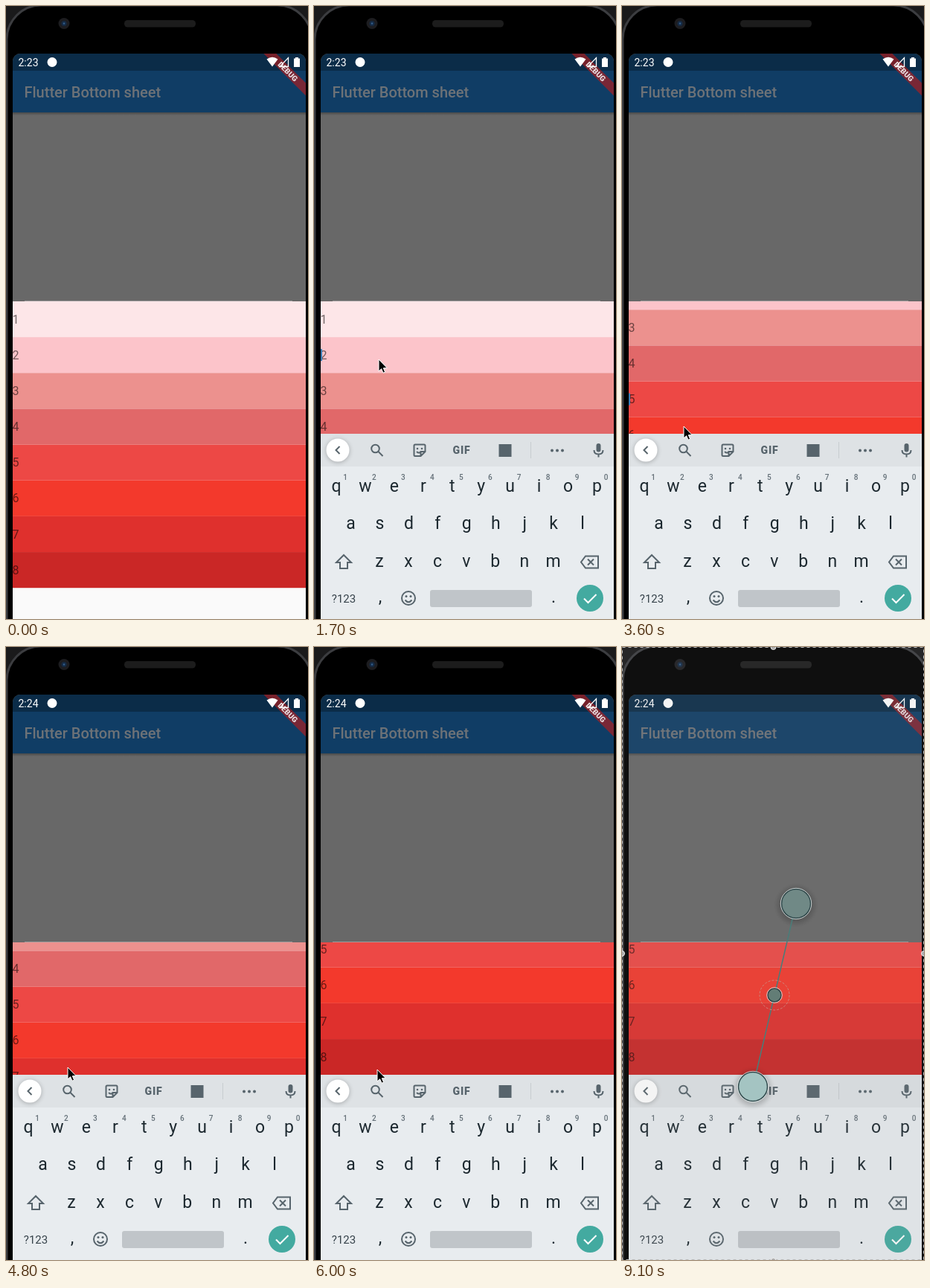
An HTML page for the animation above (9200 ms loop, 406 by 824 pixels).

```html
<!DOCTYPE html>
<html lang="en">
<head>
<meta charset="utf-8">
<title>Bottom sheet with keyboard</title>
<style>
  html, body { margin: 0; width: 100%; height: 100%; overflow: hidden; background: #000; }
  svg { display: block; width: 406px; height: 824px; font-family: Roboto, sans-serif; }
  .icon { fill: none; stroke: #57646c; stroke-width: 2; }
  .solid { fill: #57646c; }
  .mid { text-anchor: middle; }
</style>
</head>
<body>
<svg viewBox="0 0 406 824">
  <defs>
    <clipPath id="screenClip"><rect x="9" y="64" width="394" height="780" rx="10"/></clipPath>
    <clipPath id="sheetClip"><rect x="9" y="397" width="394" height="427"/></clipPath>
    <linearGradient id="barShadow" x2="0" y2="1">
      <stop stop-color="#000" stop-opacity=".3"/><stop offset="1" stop-color="#000" stop-opacity="0"/>
    </linearGradient>
    <filter id="soft" x="-50%" y="-50%" width="200%" height="200%"><feGaussianBlur stdDeviation="3"/></filter>
  </defs>

  <!-- phone body -->
  <rect width="406" height="824" fill="#1a1a1b"/>
  <rect x="1" y="-1" width="410" height="900" rx="46" fill="#000" stroke="#3c3d40" stroke-width="3"/>
  <circle cx="78" cy="23.500" r="7.500" fill="#1d1d20"/>
  <circle cx="78" cy="23.500" r="3.500" fill="#152a44"/>
  <circle cx="78" cy="23.500" r="1.200" fill="#35608c"/>
  <rect x="159" y="19" width="96" height="9.500" rx="4.500" fill="#1c1c1c"/>

  <g clip-path="url(#screenClip)">
    <rect x="9" y="64" width="394" height="760" fill="#686868"/>
    <rect x="9" y="64" width="394" height="23" fill="#0b2c48"/>
    <rect x="9" y="87" width="394" height="56" fill="#103d65"/>
    <rect x="9" y="143" width="394" height="4" fill="url(#barShadow)"/>
    <text x="24.500" y="123" font-size="20" font-weight="500" fill="#6d7277">Flutter Bottom sheet</text>

    <path d="M25 396.500H385" stroke="#fff" stroke-opacity=".35"/>
    <g clip-path="url(#sheetClip)">
      <rect x="9" y="397" width="394" height="427" fill="#fafafa"/>
      <g id="rows"></g>
      <rect id="caret" x="9" width="2" height="16" fill="#3c7fb8"/>
    </g>

    <g id="keyboard">
      <rect x="9" y="575" width="394" height="249" fill="#e8ecef"/>
      <rect x="9" y="575" width="394" height="44" fill="#dee2e5"/>
      <circle cx="32" cy="598" r="15.500" fill="#000" opacity=".25" filter="url(#soft)"/>
      <circle cx="32" cy="597" r="15.500" fill="#fff"/>
      <path class="icon" d="M34.500 592L29.500 597L34.500 602"/>
      <circle class="icon" cx="82.500" cy="595" r="5.300"/>
      <path class="icon" d="M86.500 599L92.500 605"/>
      <path class="icon" d="M136 589.500H148Q149.500 589.500 149.500 591V599L143.500 605H136Q134.500 605 134.500 603.500V591Q134.500 589.500 136 589.500ZM149 599H143.500V605M138 599Q141 602 144 599"/>
      <circle class="solid" cx="139" cy="595" r="1.300"/><circle class="solid" cx="145" cy="595" r="1.300"/>
      <text class="solid mid" x="198.500" y="602" font-size="14" font-weight="900" letter-spacing=".8">GIF</text>
      <rect class="solid" x="248.500" y="589" width="17" height="17"/>
      <path d="M291.500 586V608" stroke="#c7ccd0"/>
      <circle class="solid" cx="320" cy="597.500" r="2"/><circle class="solid" cx="327" cy="597.500" r="2"/><circle class="solid" cx="334" cy="597.500" r="2"/>
      <rect class="solid" x="379.500" y="588" width="6" height="11.500" rx="3"/>
      <path class="icon" d="M376.500 597Q376.500 602.500 382.500 602.500T388.500 597M382.500 602V606.500" stroke-width="1.700"/>

      <g id="letters" class="mid" font-size="23" fill="#1c282f"></g>
      <path class="icon" d="M40 738L50 748H45V756H35V748H30Z"/>
      <path class="icon" d="M365 739.500H382V755.500H365L359 747.500ZM368 743.500L376 751.500M376 743.500L368 751.500"/>
      <text class="mid" x="40" y="802" font-size="15" fill="#36424a">?123</text>
      <circle class="icon" cx="127" cy="796" r="9"/>
      <path class="icon" d="M122.500 798.500Q127 804 131.500 798.500"/>
      <circle class="solid" cx="124" cy="793.500" r="1.500"/><circle class="solid" cx="130" cy="793.500" r="1.500"/>
      <rect x="156" y="785" width="137" height="23" rx="3" fill="#c0c5c9"/>
      <circle cx="371" cy="796" r="18" fill="#43aaa0"/>
      <path d="M363 796.500L368.500 802L379.500 791" fill="none" stroke="#fff" stroke-width="2"/>
    </g>

    <!-- debug ribbon -->
    <g transform="translate(403 64) rotate(45)">
      <rect x="-50" y="28" width="100" height="12" fill="#b71c1c" fill-opacity=".63"/>
      <text class="mid" y="37.700" font-size="10.200" font-weight="900" fill="#fff" fill-opacity=".85">DEBUG</text>
    </g>

    <!-- status bar -->
    <g fill="#fff">
      <text id="clock" x="16.500" y="81" font-size="14"></text>
      <circle cx="62" cy="75.500" r="6.500"/>
      <path d="M350.500 71.500Q358 66 365.500 71.500L358 81.500Z"/>
      <path d="M379.500 69.500V81.500H368Z" fill="none" stroke="#fff" stroke-width="1.300"/>
      <path d="M387 70.500H389V69H393V70.500H395V82H387Z"/>
    </g>
  </g>

  <path id="mouse" d="M0 0V16L3.600 12.700L6 18.200L8.600 17.100L6.300 11.700H11.300Z" fill="#000" stroke="#fff"/>

  <g id="pinch">
    <circle cx="234" cy="347" r="25" fill="#000" opacity=".2" filter="url(#soft)"/>
    <circle cx="176" cy="593" r="24" fill="#000" opacity=".2" filter="url(#soft)"/>
    <path d="M229.500 364L180.500 572" stroke="#417a76" stroke-width="1.500"/>
    <circle cx="205" cy="468" r="20" fill="none" stroke="#d58378" stroke-dasharray="3 2"/>
    <g stroke="#203c3f" stroke-width="1.500">
      <circle cx="234" cy="345" r="19.500" fill="#6c8885"/>
      <circle cx="205" cy="468" r="9" fill="#5d7a73"/>
      <circle cx="176" cy="591" r="19.500" fill="#a6cac7"/>
    </g>
    <g fill="none" stroke="#e8f4f3" stroke-opacity=".8">
      <circle cx="234" cy="345" r="20.700"/>
      <circle cx="205" cy="468" r="10.300"/>
      <circle cx="176" cy="591" r="20.700"/>
    </g>
  </g>

  <g id="selection">
    <rect width="406" height="824" fill="#969696" fill-opacity=".1"/>
    <rect x=".5" y=".5" width="405" height="823" fill="none" stroke="#bbb" stroke-dasharray="4 4"/>
    <g fill="#aaa" stroke="#eee">
      <circle cx="203.500" cy="0" r="3.500"/><circle cx="203.500" cy="825" r="3.500"/>
      <circle cx="0" cy="412" r="3.500"/><circle cx="406" cy="412" r="3.500"/>
    </g>
  </g>
</svg>
<script>
const LOOP = 9200, STEP = 100, ROW = 48.15, SHEET_TOP = 397;
const $ = id => document.getElementById(id);
const colors = ['#fde6e8', '#fcc4ca', '#ec918e', '#e16869', '#ed4845', '#f3392c', '#df302d', '#ca2726'];

$('rows').innerHTML = colors.map((color, i) => {
  const y = SHEET_TOP + i * ROW;
  return `<rect x="9" y="${y}" width="394" height="${ROW}" fill="${color}"/>
    <text x="8.500" y="${y + 29.7}" font-size="16" fill="#000" fill-opacity=".55">${i + 1}</text>`;
}).join('');

const keyRow = (keys, x, y) => [...keys].map((key, i) =>
  `<text x="${x + i * 38.95}" y="${y}">${key}</text>`).join('');
$('letters').innerHTML = keyRow('qwertyuiop', 30, 653) + keyRow('asdfghjkl', 49.5, 703) +
  keyRow('zxcvbnm', 88, 754) + keyRow(',', 89, 802) + keyRow('.', 322, 802) +
  `<g font-size="10" font-weight="500" fill="#647078">${keyRow('1234567890', 42, 637)}</g>`;

// Keys are [time, ...values]
const mousePath = [[0, 230, 765], [700, 87, 475], [1700, 87, 475], [2100, 83, 565],
  [5300, 83, 565], [5600, 85, 568], [6200, 85, 568], [7100, 175, 589]];
const scrollPath = [[2200, 0], [2500, 36], [3000, 36], [3300, 85], [4100, 85], [4400, 133],
  [4800, 133], [5100, 181], [5500, 181], [5800, 207]];
const keyboardPath = [[900, 249], [1500, 0]];
const selectionPath = [[7800, 0], [8500, 1]];
const focuses = [[700, 2], [2200, 4], [3200, 5], [4200, 6], [4900, 7], [5400, 8]];

function track(keys, t) {
  const next = keys.findIndex(key => key[0] > t);
  if (next === 0) return keys[0].slice(1);
  if (next < 0) return keys.at(-1).slice(1);
  const [a, b] = [keys[next - 1], keys[next]];
  const p = (t - a[0]) / (b[0] - a[0]);
  const eased = p * p * (3 - 2 * p);
  return a.slice(1).map((v, i) => v + (b[i + 1] - v) * eased);
}

const move = (id, x, y) => $(id).setAttribute('transform', `translate(${x} ${y})`);
const show = (id, on) => $(id).setAttribute('visibility', on ? 'visible' : 'hidden');

function draw(t) {
  const [scroll] = track(scrollPath, t);
  move('rows', 0, -scroll);
  move('keyboard', 0, track(keyboardPath, t)[0]);
  move('mouse', ...track(mousePath, t));
  show('mouse', t >= 100 && t < 7700);

  const focus = focuses.findLast(([start]) => start <= t);
  show('caret', focus && (t - focus[0]) % 1000 < 500);
  if (focus) $('caret').setAttribute('y', SHEET_TOP + (focus[1] - 1) * ROW - scroll + 16);

  $('clock').textContent = t < 4000 ? '2:23' : '2:24';
  show('pinch', t >= 7700);
  $('selection').setAttribute('opacity', track(selectionPath, t)[0]);
}

const begin = performance.now();
function frame() {
  const t = (performance.now() - begin) % LOOP;
  draw(Math.floor(t / STEP) * STEP);
  requestAnimationFrame(frame);
}
frame();
</script>
</body>
</html>
```
